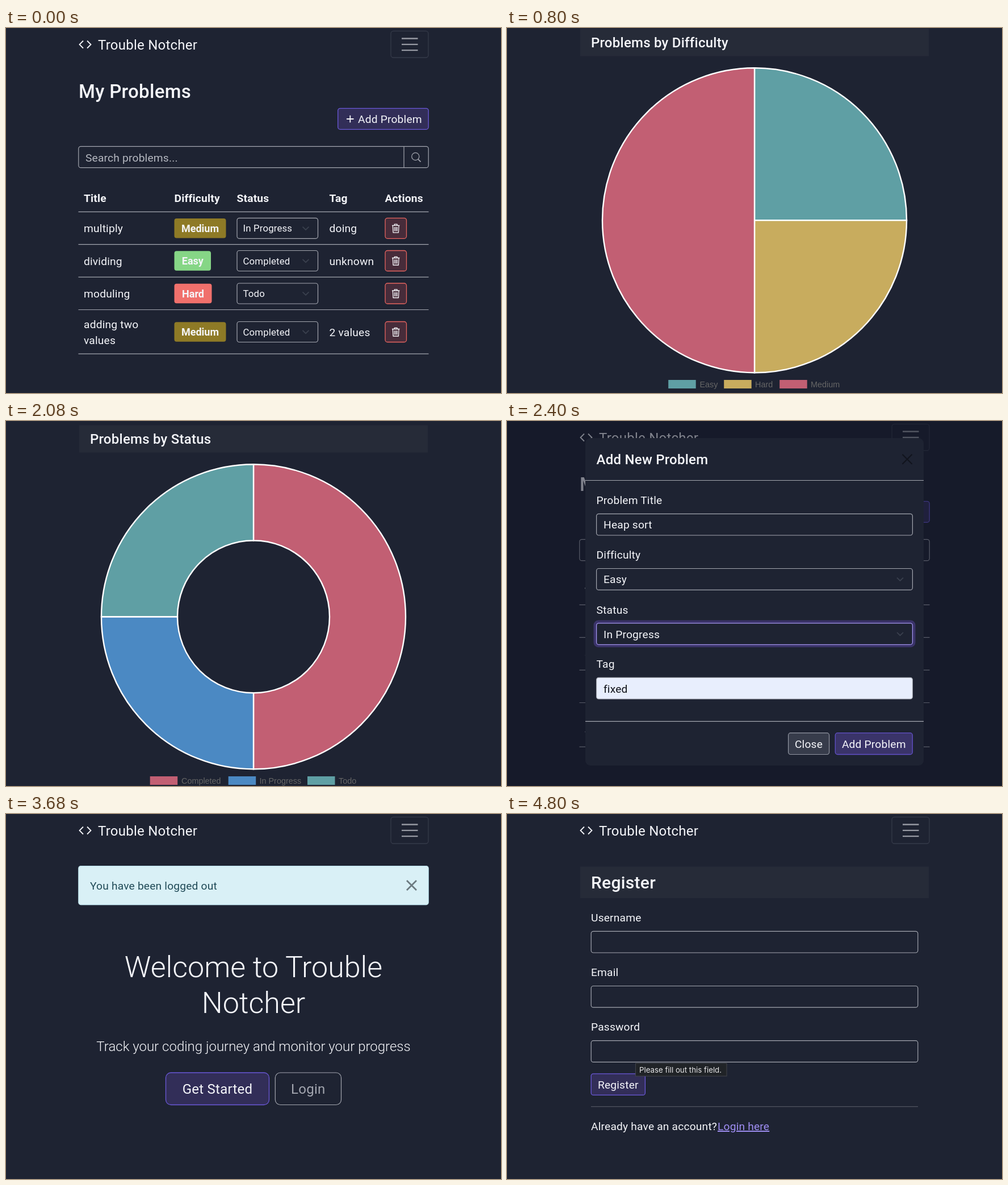
Animation of 872x642 px, one loop 5.6 s. Source, as an HTML page:

```html
<!DOCTYPE html>
<html lang="en">
<head>
<meta charset="utf-8">
<title>Trouble Notcher</title>
<style>
  html, body { margin: 0; height: 100%; overflow: hidden; background: #1e2332; }
  svg { display: block; width: 100vw; height: 100vh; }
  .scene {
    visibility: hidden;
    animation: show 5.6s step-end infinite;
    animation-delay: calc(var(--i) * .8s - 5.6s);
  }
  @keyframes show {
    0% { visibility: visible; }
    14.28571% { visibility: hidden; }
  }
  text { font: 400 19.2px Roboto, sans-serif; letter-spacing: .01em; fill: #f5f6fa; }
  .mid text, text.mid { text-anchor: middle; }
  .big { font-size: 24px; }
  .head { font-size: 24px; font-weight: 500; }
  .title { font-size: 30px; font-weight: 500; }
  .bold text { font-weight: 700; }
  .badge text { font-size: 18px; font-weight: 700; letter-spacing: 0; text-anchor: middle; }
  .small text { font-size: 16.8px; }
  .display { font-size: 52px; font-weight: 300; letter-spacing: 0; }
  .legend text { font: 14.4px "Liberation Sans", Arial, sans-serif; letter-spacing: 0; fill: #666; }
  .legend rect, .chart path { stroke: #fff; stroke-width: 2.4; }
  .line { fill: none; stroke: #a3a6af; stroke-width: 1.2; }
  .icon { fill: none; stroke: #f5f6fa; stroke-width: 1.8; }
  .primary { fill: #322e58; stroke: #6a58d8; stroke-width: 1.3; }
  .card { fill: #262b38; }
  .link { fill: #a08ff5; text-decoration: underline; }
  .teal { fill: #5f9fa4; } .gold { fill: #c8ac5e; }
  .pink { fill: #c25f73; } .blue { fill: #4b89c3; }
</style>
</head>
<body>
<svg viewBox="0 0 872 642">
  <defs>
    <g id="nav">
      <path class="icon" stroke-width="2" d="M136 22.500l-6.500 6.500 6.500 6.500M143 22.500l6.500 6.500-6.500 6.500"/>
      <text class="big" x="162" y="37.500">Trouble Notcher</text>
      <rect x="678" y="5.300" width="66" height="46.700" rx="4.500" fill="none" stroke="#353a49" stroke-width="1.3"/>
      <path d="M697 18.500h28.500m-28.500 10.300h28.500m-28.500 10.300h28.500" stroke="#9699a2" stroke-width="2.300"/>
    </g>
    <path id="chevron" d="M-5.500 -2.700L0 2.700L5.500 -2.700" fill="none" stroke="#3a404e" stroke-width="1.800"/>
    <g id="select">
      <rect class="line" x="407" y="-18" width="142.500" height="36" rx="4"/>
      <use href="#chevron" x="528"/>
    </g>
    <g id="trash">
      <rect x="668" y="-18" width="37.500" height="36" rx="4" fill="#472c3a" stroke="#e5645f" stroke-width="1.300"/>
      <path class="icon" stroke-linejoin="round" style="stroke-width:1.300"
        d="M680 -5h13.400M684.300 -5v-2.200h4.800v2.200M681.300 -5l.7 12.500h9.400l.7 -12.500M684.400 -2.300v7.300M686.700 -2.300v7.300M689 -2.300v7.300"/>
    </g>
    <g id="tools"><use href="#select"/><use href="#trash"/></g>
    <rect id="field" class="line" x="148.200" y="206.300" width="575.600" height="37.700" rx="4"/>
    <rect id="input" class="line" x="157.600" y="163.300" width="556.800" height="37.700" rx="4"/>
    <path id="cross" d="M-8.500 -8.500L8.500 8.500M8.500 -8.500L-8.500 8.500"/>
    <rect id="key" y="619" width="48.500" height="15"/>

    <g id="list">
      <use href="#nav"/>
      <text x="128" y="123" style="font-size:33px;font-weight:500">My Problems</text>
      <rect class="primary" x="584.700" y="141.300" width="159.500" height="37" rx="4"/>
      <path class="icon" d="M600 160h12.500M606.300 153.700v12.500"/>
      <text x="620" y="166.700">Add Problem</text>
      <path class="line" d="M701 208.300v37.400"/>
      <rect class="line" x="127.800" y="208.300" width="616.400" height="37.400" rx="4"/>
      <text x="140" y="234.500" style="fill:#b5b8c0">Search problems...</text>
      <g class="line"><circle cx="721.300" cy="226" r="6.600"/><path d="M726 230.800l4.600 4.600" stroke-width="1.700"/></g>
      <g class="bold">
        <text x="137" y="306">Title</text>
        <text x="296.500" y="306">Difficulty</text>
        <text x="406.500" y="306">Status</text>
        <text x="569.500" y="306">Tag</text>
        <text x="667.500" y="306">Actions</text>
      </g>
      <path class="line" d="M127.500 323.300h617m-617 57.400h617m-617 57.400h617m-617 57.400h617m-617 77.700h617"/>
      <use href="#tools" y="352.300"/>
      <use href="#tools" y="409.500"/>
      <use href="#tools" y="467"/>
      <use href="#tools" y="534.500"/>
      <text x="137" y="359.300">multiply</text>
      <text x="137" y="416.700">dividing</text>
      <text x="137" y="474">moduling</text>
      <text x="137" y="527.500">adding two</text>
      <text x="137" y="556">values</text>
      <text x="569.500" y="359.300">doing</text>
      <text x="569.500" y="416.700">unknown</text>
      <text x="569.500" y="541.500">2 values</text>
      <g class="small">
        <text x="417.500" y="358.200">In Progress</text>
        <text x="417.500" y="415.700">Completed</text>
        <text x="417.500" y="473">Todo</text>
        <text x="417.500" y="540.500">Completed</text>
      </g>
      <g class="badge">
        <rect x="296.500" y="335" width="91" height="34.500" rx="4" fill="#8e7a26"/>
        <rect x="296.500" y="392.300" width="64.500" height="34.500" rx="4" fill="#86d686"/>
        <rect x="296.500" y="449.700" width="66" height="34.500" rx="4" fill="#f0706c"/>
        <rect x="296.500" y="517.200" width="91" height="34.500" rx="4" fill="#8e7a26"/>
        <text x="342" y="358.700">Medium</text>
        <text x="328.800" y="416">Easy</text>
        <text x="329.500" y="473.500">Hard</text>
        <text x="342" y="541">Medium</text>
      </g>
    </g>
  </defs>

  <rect width="872" height="642" fill="#1e2332"/>

  <g class="scene" style="--i:0"><use href="#list"/></g>

  <g class="scene" style="--i:1">
    <rect class="card" x="129" y="1.500" width="614" height="48"/>
    <text class="head" x="148" y="34.300">Problems by Difficulty</text>
    <g class="chart" transform="translate(436 338.300)">
      <path class="teal" d="M0 0V-268A268 268 0 0 1 268 0Z"/>
      <path class="gold" d="M0 0H268A268 268 0 0 1 0 268Z"/>
      <path class="pink" d="M0 0V268A268 268 0 0 1 0 -268Z"/>
    </g>
    <g class="legend">
      <use href="#key" x="284.200" class="teal"/><text x="339.500" y="631.500">Easy</text>
      <use href="#key" x="382.200" class="gold"/><text x="437" y="631.500">Hard</text>
      <use href="#key" x="480.200" class="pink"/><text x="535" y="631.500">Medium</text>
    </g>
  </g>

  <g class="scene" style="--i:2">
    <rect class="card" x="129" y="7.500" width="614" height="48"/>
    <text class="head" x="148" y="40.300">Problems by Status</text>
    <g class="chart" transform="translate(436 344.300)">
      <path class="pink" d="M0 -268A268 268 0 0 1 0 268V134A134 134 0 0 0 0 -134Z"/>
      <path class="blue" d="M0 268A268 268 0 0 1 -268 0H-134A134 134 0 0 0 0 134Z"/>
      <path class="teal" d="M-268 0A268 268 0 0 1 0 -268V-134A134 134 0 0 0 -134 0Z"/>
    </g>
    <g class="legend" transform="translate(0 6)">
      <use href="#key" x="253.700" class="pink"/><text x="309" y="631.500">Completed</text>
      <use href="#key" x="391.700" class="blue"/><text x="446.500" y="631.500">In Progress</text>
      <use href="#key" x="531" class="teal"/><text x="586" y="631.500">Todo</text>
    </g>
  </g>

  <g class="scene" style="--i:3">
    <use href="#list"/>
    <rect width="872" height="642" fill="#0e1322" fill-opacity=".5"/>
    <rect x="138" y="30" width="596" height="576" rx="9" fill="#1e2332"/>
    <path class="line" d="M138 104.500h596M138 528.300h596"/>
    <text class="head" x="157.500" y="76">Add New Problem</text>
    <use href="#cross" x="705" y="67.300" stroke="#11141d" stroke-width="2"/>
    <text x="157.500" y="146">Problem Title</text>
    <text x="157.500" y="242">Difficulty</text>
    <text x="157.500" y="338.500">Status</text>
    <text x="157.500" y="434">Tag</text>
    <use href="#input"/>
    <use href="#input" y="96.200"/>
    <rect x="155" y="353" width="562" height="42.500" rx="6" fill="none" stroke="#3a3369" stroke-width="5"/>
    <rect x="157.600" y="355.600" width="556.800" height="37.700" rx="4" fill="#1e2332" stroke="#a294ef" stroke-width="1.300"/>
    <rect x="157.600" y="451.300" width="556.800" height="37.700" rx="4" fill="#e8eefd" stroke="#a3a6af" stroke-width="1.200"/>
    <use href="#chevron" x="692.500" y="278.300"/>
    <use href="#chevron" x="692.500" y="374.500"/>
    <text x="170" y="188.800">Heap sort</text>
    <text x="170" y="285">Easy</text>
    <text x="170" y="381.500">In Progress</text>
    <text x="170" y="477.500" style="fill:#10121a">fixed</text>
    <rect x="495.600" y="548.700" width="72" height="37.800" rx="4" fill="#373c4b" stroke="#9296a2" stroke-width="1.200"/>
    <rect x="578.300" y="548.700" width="136" height="37.800" rx="4" fill="#3a3469" stroke="#6150c8" stroke-width="1.300"/>
    <g class="mid">
      <text x="531.500" y="575">Close</text>
      <text x="646.300" y="575">Add Problem</text>
    </g>
  </g>

  <g class="scene" style="--i:4">
    <use href="#nav"/>
    <rect x="127.800" y="91.600" width="616.400" height="68" rx="4" fill="#d9f0f6" stroke="#bfe4ee" stroke-width="1.200"/>
    <text x="148" y="132.500" style="fill:#204a57">You have been logged out</text>
    <use href="#cross" x="714.500" y="125.500" stroke="#6c7a80" stroke-width="2.800"/>
    <g class="mid">
      <text class="display" x="436" y="287">Welcome to Trouble</text>
      <text class="display" x="436" y="349.500">Notcher</text>
      <text x="436" y="416.500" style="font-size:24px;font-weight:300;letter-spacing:0">Track your coding journey and monitor your progress</text>
      <rect class="primary" x="281.500" y="455" width="182" height="56.500" rx="9"/>
      <rect class="line" x="474.300" y="455" width="116.200" height="56.500" rx="9"/>
      <text class="big" x="372.500" y="492">Get Started</text>
      <text class="big" x="532.300" y="492" style="fill:#a3a6b0">Login</text>
    </g>
  </g>

  <g class="scene" style="--i:5">
    <use href="#nav"/>
    <rect class="card" x="129" y="92.500" width="614" height="55.500"/>
    <text class="title" x="148" y="131">Login</text>
    <text x="148" y="188.800">Email</text>
    <use href="#field"/>
    <text x="148" y="285">Password</text>
    <use href="#field" y="96.200"/>
    <rect class="primary" x="148.200" y="360.600" width="70.200" height="37.600" rx="4"/>
    <text class="mid" x="183.300" y="386.300">Login</text>
    <path d="M148 418.500h576" stroke="#4f535f" stroke-width="1.200"/>
    <text x="148" y="459.700">Don't have an account?</text>
    <text class="link" x="351" y="459.700">Register here</text>
  </g>

  <g class="scene" style="--i:6">
    <use href="#nav"/>
    <rect class="card" x="129" y="92.500" width="614" height="55.500"/>
    <text class="title" x="148" y="131">Register</text>
    <text x="148" y="188.800">Username</text>
    <use href="#field"/>
    <text x="148" y="285">Email</text>
    <use href="#field" y="96.200"/>
    <text x="148" y="381.300">Password</text>
    <use href="#field" y="192.400"/>
    <rect class="primary" x="148.200" y="456.800" width="95.200" height="37.600" rx="4"/>
    <text class="mid" x="195.800" y="482.500">Register</text>
    <rect x="226.500" y="438.500" width="160.500" height="22.500" fill="#202327" stroke="#42454b"/>
    <text x="233" y="454.500" style="font:13.300px Inter,sans-serif;letter-spacing:0;fill:#e6e6e8">Please fill out this field.</text>
    <path d="M148 514.700h576" stroke="#4f535f" stroke-width="1.200"/>
    <text x="148" y="556">Already have an account?</text>
    <text class="link" x="371" y="556">Login here</text>
  </g>
</svg>
</body>
</html>
```
